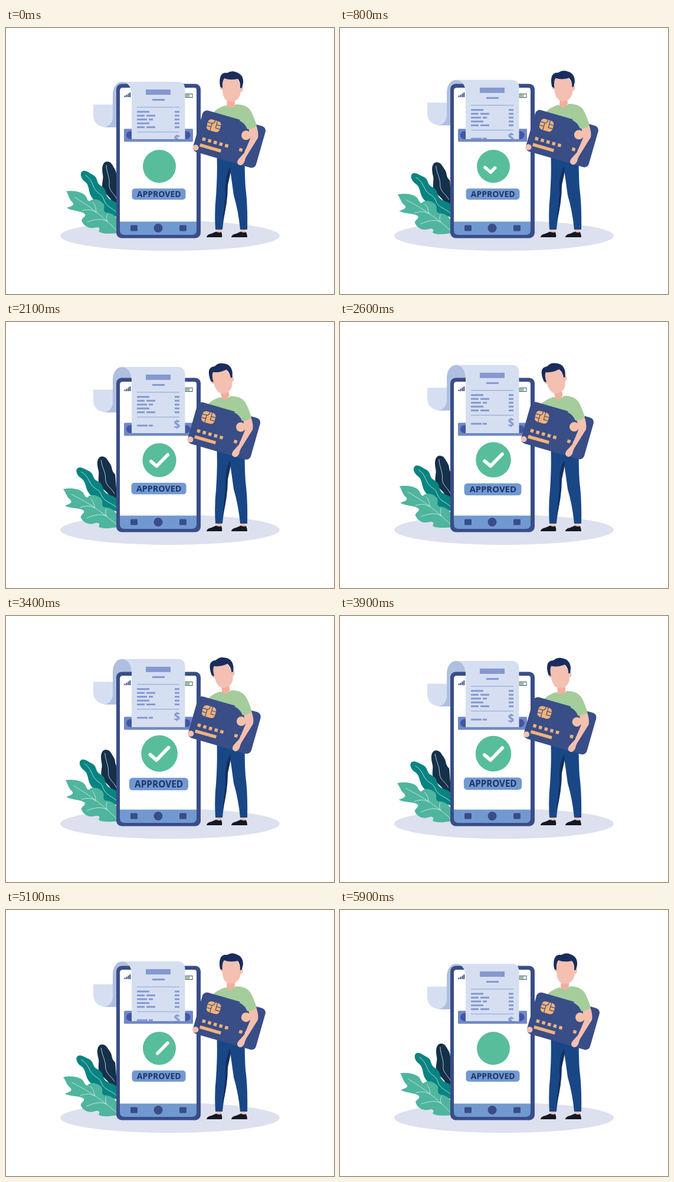
An HTML page that plays this animation: 556x450 px, repeating every 6 s.

```html
<!DOCTYPE html>
<html lang="en">
<head>
<meta charset="utf-8">
<title>Payment approved</title>
<style>
  html, body { margin: 0; width: 100%; height: 100%; overflow: hidden; background: #fff; }
  svg { display: block; width: 556px; height: 450px; }
  text { font-family: "Open Sans", "Noto Sans", sans-serif; font-weight: 700; text-anchor: middle; }
  .vein { fill: none; stroke: #d9f0ee; stroke-width: .8; stroke-linecap: round; }
  .ink { fill: #8598cf; }
  .navy { fill: #394d87; }
  .skin { fill: #f3c0b1; }
  .gold { fill: #f2b279; }
  .shirt { fill: #a5cc9b; }
</style>
</head>
<body>
<svg viewBox="0 0 556 450">
  <defs>
    <clipPath id="slotClip"><rect x="140" y="0" width="200" height="188"/></clipPath>
  </defs>

  <ellipse cx="278" cy="351.5" rx="186" ry="25.5" fill="#dce0ef"/>

  <g id="leaves">
    <path fill="#15304a" d="M170 226C163 228 162 238 164 248C166 257 160 265 165 274C170 283 177 286 181 296L192 308V258C185 251 189 246 184 238C180 231 178 225 170 226Z"/>
    <path class="vein" d="M170 232C171 247 176 252 175 264S184 280 188 290"/>
    <path fill="#078481" d="M130 242C124 245 127 255 134 260C142 266 139 277 145 286C150 294 158 295 161 304C166 315 178 316 192 321V300C186 292 178 293 173 287C167 279 172 273 161 267C152 262 157 254 148 249C142 246 136 240 130 242Z"/>
    <path class="vein" d="M135 249C147 258 146 266 151 273C157 282 163 280 166 291C170 303 180 304 189 313"/>
    <path fill="#4fb59e" d="M102 276C114 274 130 277 135 284C138 289 138 293 142 293C148 287 159 290 165 297C169 302 163 308 169 312C178 312 188 318 191 330V347C178 348 162 349 157 344C161 338 157 336 149 338C139 340 130 333 128 325C130 320 136 319 134 315C129 309 111 310 103 304C110 302 117 300 113 295C106 289 107 283 102 276Z"/>
    <path class="vein" d="M116 286C140 301 157 312 188 343M147 295C152 300 152 305 153 311M129 309C141 306 147 308 153 312M138 328C152 323 163 322 171 327M172 315C170 320 170 323 172 328"/>
  </g>

  <g class="paper">
    <path fill="#afbfe0" d="M181 76V22C181 9 188 0 197 0S213 9 213 22V30H190V76Z"/>
    <path fill="#afbfe0" d="M165 77Q181 74 181 56V40H190V77Z"/>
    <path fill="#d5dff1" d="M148 38.500H181V58Q181 73 168 77Q148 74 148 56Z"/>
  </g>

  <rect class="navy" x="187" y="94.500" width="143" height="261" rx="9"/>
  <path fill="#fff" d="M198 101H319Q323 101 323 105V330H193V106Q193 101 198 101Z"/>
  <path fill="#7199d1" d="M193 327.500H323V342Q323 350 315 350H201Q193 350 193 342Z"/>
  <g class="navy">
    <rect x="211" y="333.500" width="12" height="10" rx="1.500"/>
    <circle cx="258" cy="338.500" r="7.500"/>
    <rect x="294" y="333.500" width="12" height="10" rx="1.500"/>
    <path d="M200.500 117v-2.500h2v2.500zM203.500 117v-4h2v4zM206.500 117v-6h2v6zM209.300 117v-8h2v8z"/>
  </g>
  <rect x="304" y="111.500" width="12" height="6" fill="#fff" stroke="#394d87"/>
  <rect x="305" y="112.500" width="6.500" height="4" fill="#91c46c"/>

  <rect x="200" y="170.500" width="117" height="22" rx="1.500" fill="#7188c5"/>
  <rect x="204" y="174.500" width="108.500" height="13.500" rx="6.700" fill="#4057a4"/>

  <g clip-path="url(#slotClip)">
    <g class="paper">
      <path fill="#d5dff1" d="M197 0H291Q303.500 0 303.500 13V130H213V22C213 9 206 0 197 0Z"/>
      <g class="ink" id="print">
        <rect x="237" y="13" width="42" height="9"/>
        <rect x="248" y="29" width="21" height="3"/>
        <rect x="222" y="42.500" width="72" height=".9"/>
        <rect x="222" y="84.500" width="72" height=".9"/>
        <text x="290" y="104" font-size="19">$</text>
      </g>
    </g>
  </g>

  <g id="result">
    <circle cx="260" cy="234" r="28" fill="#58bd9b"/>
    <path id="check" d="M246 236L255.500 244L274 225" pathLength="1" fill="none" stroke="#fff" stroke-width="5.500" stroke-linecap="round" stroke-linejoin="round"/>
    <rect x="213.500" y="271.500" width="91" height="19" rx="5" fill="#7199d1"/>
    <text x="259.200" y="286" font-size="14" fill="#203669">APPROVED</text>
  </g>

  <path class="skin" d="M357 337h8v10h-8zM398 337h8v10h-8z"/>
  <path fill="#161821" d="M340 353.500Q341 349 348 348L356 344.500Q361 347 365 345Q367 350 366 354H340ZM382 353.500Q383 349 390 348L398 344.500Q403 347 407 345Q409 350 409 354H382Z"/>
  <path fill="#194786" d="M357 205H405Q404 240 406 270Q410 300 409 341H397Q394 310 386 283L380 240Q375 250 375 266C375 296 370 312 367 341H355Q353 312 356 284Q359 240 357 205Z"/>
  <path fill="#12305f" d="M380 234Q370 252 372 280L367 330Q376 296 376 266L381 243Z"/>

  <g id="body">
    <path class="shirt" d="M372 131Q381 137 390 129Q407 129 414 139Q420 149 424 166L404 210H358L355 150L349 145Q358 135 372 131Z"/>
    <g id="head">
      <path fill="#f6ae9c" d="M375.500 115H388V130Q381 139 374 132Z"/>
      <path class="skin" d="M366 95Q362 96 363 101Q364 105 367 104Q367 115 372 121Q377 126 386 124Q396 121 398 108Q402 108 402 102Q402 98 398 99L392 84H368Z"/>
      <path fill="#192d5d" d="M367 102L363 99Q361 88 364 81Q367 75 375 76Q383 71 391 75Q403 79 402 93L400 101L397 102Q398 92 393 86Q380 89 370 85Q366 90 367 102Z"/>
    </g>
    <g transform="translate(378.500 188) rotate(16)">
      <rect class="navy" x="-55.500" y="-36.500" width="111" height="73" rx="8"/>
      <g transform="translate(2 1)">
        <rect class="gold" x="-45" y="-25" width="23" height="19" rx="6"/>
        <path fill="none" stroke="#394d87" stroke-width="1.200" d="M-45-18.500h7.500v6H-45M-22-18.500h-7.500v6h7.500M-37.500-12.500v6.500M-29.500-25v6.500M-37.500-18.500q4-1 4-6.500"/>
      </g>
      <g class="gold" id="digits"><rect x="-45" y="20.500" width="37" height="5.500"/></g>
    </g>
    <circle class="skin" cx="321.500" cy="202.500" r="5"/>
    <circle cx="407" cy="181.500" r="8" fill="#f6c1a6"/>
    <path class="skin" d="M411 168L424 164Q429 178 427 186L407 218Q405 222 404 227Q399 235 394 231Q390 228 394 222L404 211L414 187Z"/>
    <path class="shirt" d="M396 157L404 138L414 139Q420 149 425 165Q419 171 409 171Q405 161 396 157Z"/>
  </g>
</svg>
<script>
const $ = id => document.getElementById(id);
const LOOP = 6000;

function addRect(parent, x, y, width, height) {
  const rect = document.createElementNS("http://www.w3.org/2000/svg", "rect");
  Object.entries({ x, y, width, height }).forEach(([key, value]) => rect.setAttribute(key, value));
  parent.append(rect);
}

// Receipt lines: widths of the words in each row
[[21], [13, 15], [17, 7], [21], [13, 15]].forEach((words, row) => {
  const y = 49.3 + row * 6.5;
  let x = 222;
  for (const width of words) {
    addRect($("print"), x, y, width, 3);
    x += width + 3;
  }
  addRect($("print"), 286, y, 8, 3);
});
addRect($("print"), 222, 97.8, 18, 3);
addRect($("print"), 242, 97.8, 7, 3);
for (const x of [-44, -34, -24, -14, -4, 21, 31]) addRect($("digits"), x, 9.3, 5.5, 5.5);

const clamp = x => Math.min(1, Math.max(0, x));
const ease = x => (1 - Math.cos(Math.PI * clamp(x))) / 2;
// Rises from 0 to 1 and back between two times
const swell = (t, from, to) => (1 - Math.cos(2 * Math.PI * clamp((t - from) / (to - from)))) / 2;
const transform = (el, value) => el.setAttribute("transform", value);

function draw(t) {
  const top = 91 - 19 * swell(t, 0, LOOP);
  document.querySelectorAll(".paper").forEach(el => transform(el, `translate(0 ${top})`));

  transform($("leaves"), `rotate(${-6.8 * swell(t % 3000, 0, 3000)} 187 346)`);

  const lean = swell(t, 0, 5300);
  transform($("body"), `translate(${-10 * lean} ${-4.2 * lean})`);
  transform($("head"), `rotate(${-15 * lean} 380 130)`);

  const scale = 1 + 0.1 * swell(t, 1500, 5200);
  transform($("result"), `translate(259.5 248) scale(${scale}) translate(-259.5 -248)`);

  const start = ease((t - 4500) / 1450), end = ease(t / 1450);
  $("check").setAttribute("stroke-dasharray", `${end - start} 2`);
  $("check").setAttribute("stroke-dashoffset", -start);
  $("check").setAttribute("visibility", end - start > 0.01 ? "visible" : "hidden");
}

function tick(now) {
  draw(Math.floor(now % LOOP / 100) * 100);
  requestAnimationFrame(tick);
}
draw(0);
requestAnimationFrame(tick);
</script>
</body>
</html>
```
